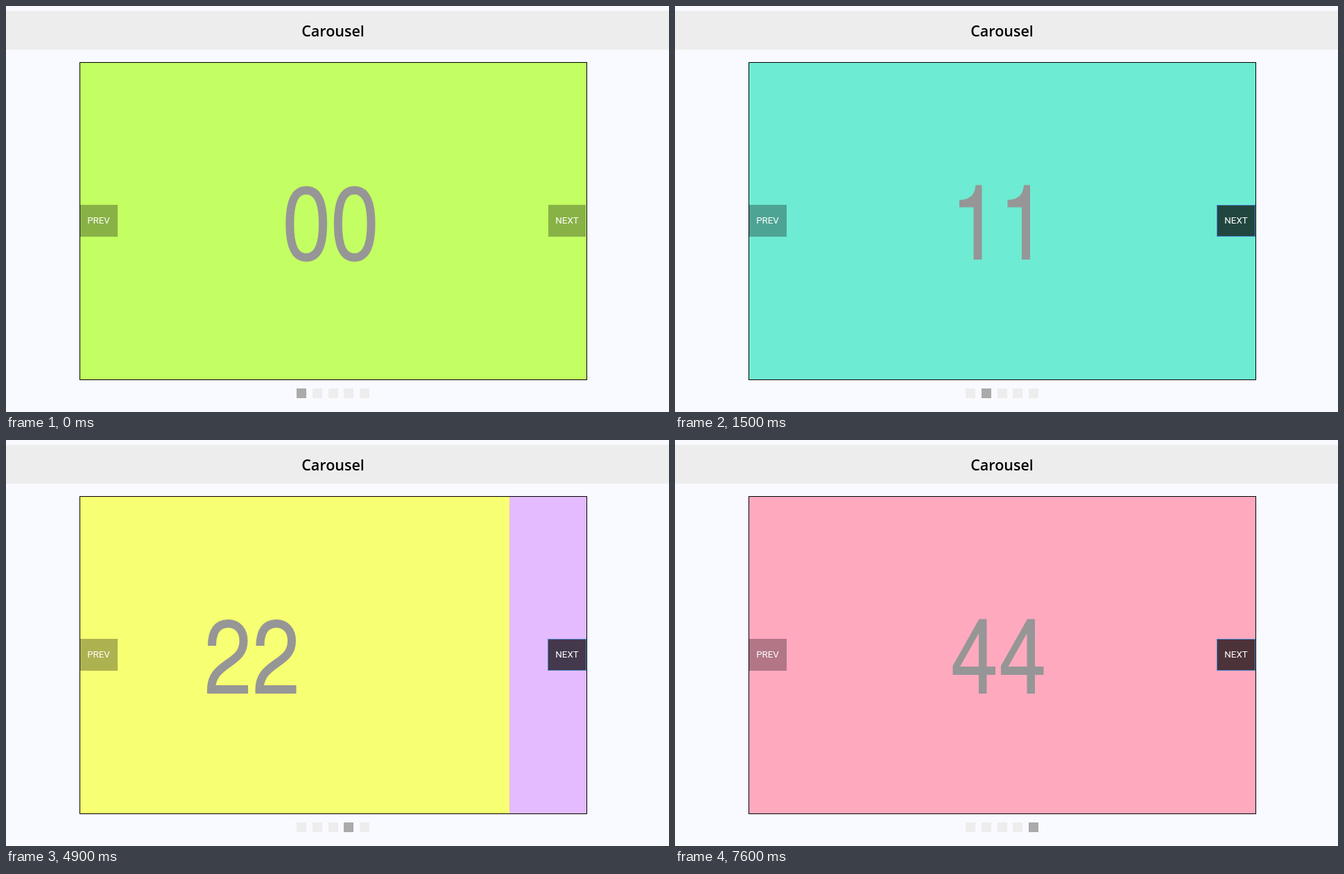
Recreate the animation shown at these times as an HTML page. Size 956x586 px, loop 8000 ms.

```html
<!DOCTYPE html>
<html lang="en">
<head>
<meta charset="utf-8">
<title>Carousel</title>
<style>
  html, body { margin: 0; width: 100%; height: 100%; overflow: hidden; background: #f9faff; }
  svg { display: block; }
  text { text-anchor: middle; }
  .title { font: 600 21.5px "Open Sans", "Noto Sans", sans-serif; }
  .label { font: 13.33px Roboto, "Liberation Sans", sans-serif; fill: #fff; }
  .line { fill: none; stroke: #969696; stroke-width: 12; }
  .solid { fill: #969696; fill-rule: evenodd; }
</style>
</head>
<body>
<svg width="956" height="586" viewBox="0 0 956 586">
  <defs>
    <clipPath id="view"><path d="M107 82H837V539H107Z"/></clipPath>
    <path id="d0" class="line" d="M409.3 314.5C409.3 281 417 266 433 266S457 281 457 314.5 449 363 433 363 409.3 348 409.3 314.5Z"/>
    <path id="d1" class="solid" d="M410 290.5V280C425 279 432 274 433.5 258.5H442.5V366H430.5V290.5Z"/>
    <path id="d2" class="line" d="M409 297C409 276 417 265 432 265C446 265 454.5 275 454.5 290C454.5 306 446 313 433 322C417 333 408 342 408 360H461"/>
    <path id="d3" class="line" d="M410.5 295C411 276 419 266 433 266C446 266 453.5 275 453.5 288C453.5 304 445 311.5 426 311.5C448 311.5 457.5 322 457.5 338C457.5 354 448 363 433 363C417 363 409.5 352 409.5 333"/>
    <path id="d4" class="solid" d="M438.5 258.5H449.5V327H462V339H449.5V366H438V339H400.5V326ZM438 279L411 327H438Z"/>
  </defs>
  <rect y="7" width="956" height="56" fill="#ededed"/>
  <text class="title" x="471.5" y="44">Carousel</text>
  <g clip-path="url(#view)"><g id="track"></g></g>
  <rect x="106.5" y="81.5" width="731" height="458" fill="none" stroke="#000"/>
  <rect x="107" y="287" width="54" height="46" fill-opacity=".3"/>
  <text class="label" x="133.5" y="314">PREV</text>
  <rect id="next" x="782" y="287" width="54" height="46"/>
  <rect id="focus" x="781.5" y="287.5" width="55" height="45" fill="none" stroke="#4a87c8"/>
  <text class="label" x="809" y="314">NEXT</text>
  <g id="dots"></g>
</svg>
<script>
  const LOOP = 8000, TICK = 100, SLIDE_TIME = 250, WIDTH = 731;
  const HOVER = 800, PRESS = 1100, STARTS = [1200, 2675, 4832, 7332];
  const COLORS = ["#c3ff62", "#6eebd3", "#f7ff72", "#e4bbff", "#ffa9bf"];
  const [track, dots, next, focusRing] =
    ["track", "dots", "next", "focus"].map(id => document.getElementById(id));

  track.innerHTML = COLORS.map((color, i) => `
    <g transform="translate(${i * WIDTH})" role="img" aria-label="${i}${i}">
      <rect x="107" y="82" width="${WIDTH}" height="458" fill="${color}"/>
      <use href="#d${i}"/><use href="#d${i}" x="69.5"/>
    </g>`).join("");
  dots.innerHTML = COLORS.map((_, i) =>
    `<rect x="${Math.round(419 + i * 22.8)}" y="552" width="14" height="14"/>`).join("");

  // Cubic Bézier (.42, 0, .58, 1), solved for x by bisection
  function easeInOut(x) {
    if (x <= 0 || x >= 1) return x <= 0 ? 0 : 1;
    let lo = 0, hi = 1, u;
    for (let i = 0; i < 24; i++) {
      u = (lo + hi) / 2;
      const bx = 3 * u * (1 - u) * (.42 * (1 - u) + .58 * u) + u ** 3;
      if (bx < x) lo = u; else hi = u;
    }
    return u * u * (3 - 2 * u);
  }

  function draw(now) {
    const t = Math.floor(now % LOOP / TICK) * TICK;
    const position = STARTS.reduce((sum, s) => sum + easeInOut((t - s) / SLIDE_TIME), 0);
    const active = STARTS.filter(s => t >= s).length;
    track.setAttribute("transform", `translate(${-Math.round(position * WIDTH)})`);
    next.setAttribute("fill-opacity", t < HOVER ? .3 : .7);
    focusRing.setAttribute("visibility", t < PRESS ? "hidden" : "visible");
    [...dots.children].forEach((dot, i) =>
      dot.setAttribute("fill", i === active ? "#aaa" : "#ededed"));
  }

  const start = performance.now();
  function frame() {
    draw(performance.now() - start);
    requestAnimationFrame(frame);
  }
  frame();
</script>
</body>
</html>
```
